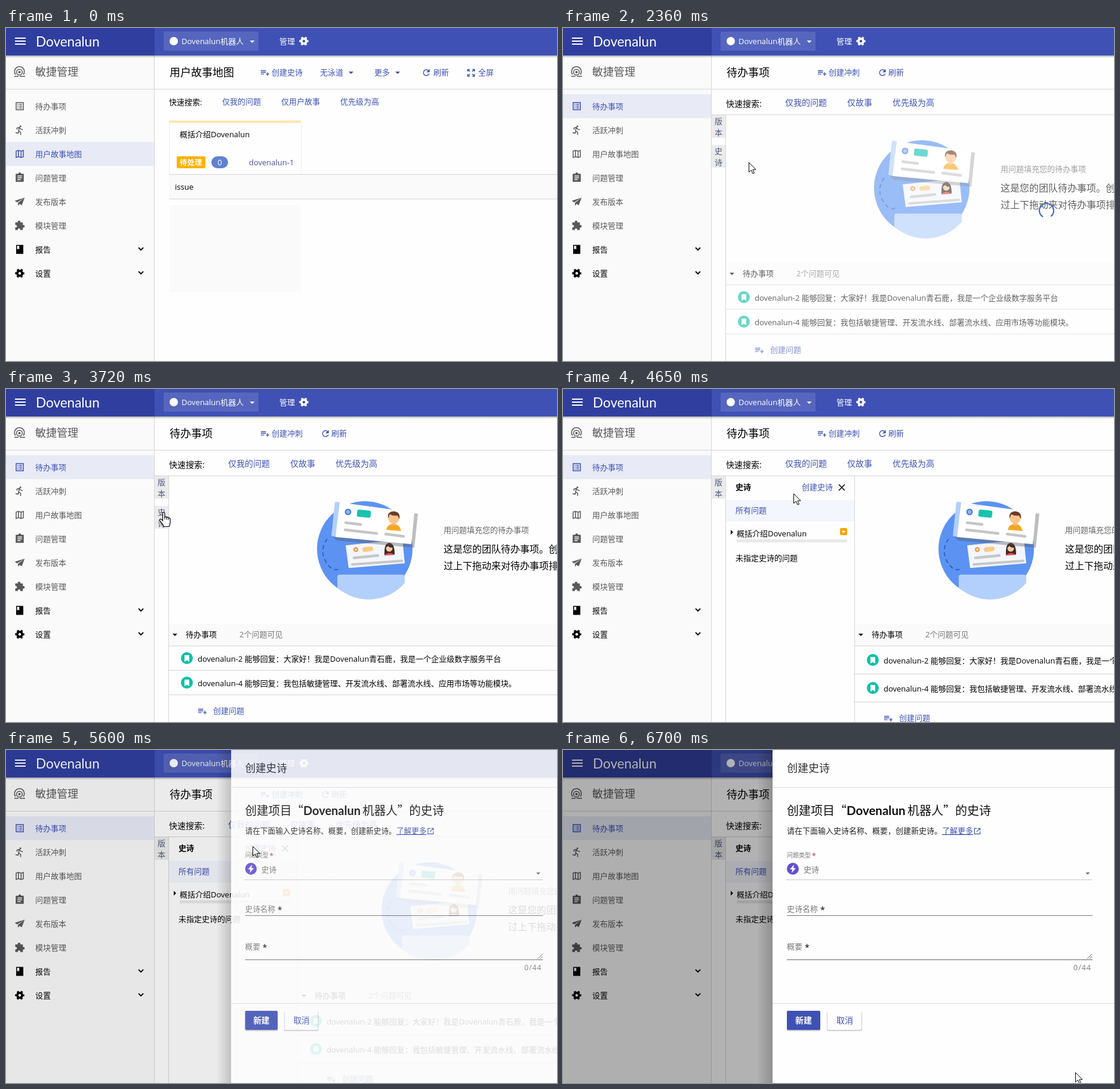
Animation of 923 by 558 pixels, one loop 6.77 s. Source, as an HTML page:

```html
<!DOCTYPE html>
<html lang="zh-CN">
<head>
<meta charset="utf-8">
<title>待办事项</title>
<style>
html, body { margin: 0; width: 100%; height: 100%; overflow: hidden; background: #fefefe; }
svg { display: block; width: 923px; height: 558px; }
text { font: 13px "Open Sans", "Noto Sans CJK SC", "Noto Sans CJK", sans-serif; }
text.cjk { font-family: "Noto Sans CJK SC", "Noto Sans CJK", sans-serif; }
text.brand { font-family: Lato, sans-serif; }
text.bold { font-weight: 700; }
</style>
</head>
<body>
<svg id="stage" viewBox="0 0 923 558" xmlns="http://www.w3.org/2000/svg"></svg>
<script>
const LOOP = 6770, BLUE = '#3f51b5', GREY = '#595959', LINE = '#d5d5d5';
const NAME = 'Dovenalun', KEY = 'dovenalun';

// Markup helpers
const text = (x, y, s, fill = '#000', size = 13, more = '') =>
  `<text x="${x}" y="${y}" fill="${fill}" style="font-size:${size}px" ${more}>${s}</text>`;
const rect = (x, y, w, h, fill, more = '') =>
  `<rect x="${x}" y="${y}" width="${w}" height="${h}" fill="${fill}" ${more}/>`;
const dot = (x, y, r, fill, more = '') => `<circle cx="${x}" cy="${y}" r="${r}" fill="${fill}" ${more}/>`;
const path = (d, fill, more = '') => `<path d="${d}" fill="${fill}" ${more}/>`;
const stroke = (d, color, width = 1, more = '') =>
  path(d, 'none', `stroke="${color}" stroke-width="${width}" ${more}`);
const hline = (x, y, color = LINE) => rect(x, y, 923 - x, 1, color);
const group = (id, body, more = '') => `<g id="${id}" ${more}>${body}</g>`;
const caret = (x, y, color, r = 4) => path(`M${x - r} ${y - r / 2}h${2 * r}l${-r} ${r}z`, color);
const bold = 'class="bold"';
const fade = (id, x2, y2, from, to) =>
  `<linearGradient id="${id}" x2="${x2}" y2="${y2}"><stop stop-opacity="${from}"/><stop offset="1" stop-opacity="${to}"/></linearGradient>`;

// Icons on a 24 unit grid
const ink = 'currentColor';
const gear = stroke('M12 6.5a5.5 5.5 0 1 1-.01 0z', ink, 5) +
  dot(12, 12, 8.8, 'none', `stroke="${ink}" stroke-width="3" stroke-dasharray="4.6 4.61" stroke-dashoffset="2.3"`);
const icons = {
  list: stroke('M4 4h16v16H4zM7 8h2m2 0h6M7 12h2m2 0h6M7 16h2m2 0h6', ink, 2),
  run: dot(13.5, 3.5, 2, ink) +
    stroke('M6 11V7.5L11 6l-1.5 8 4.5 3v6M10 14l-1.5 5-6-1.3M12 6.5c1 3 3 4.5 7 4.5', ink, 2),
  map: stroke('M4 5.5l5-1.5 6 2 5-2v14.5l-5 1.5-6-2-5 2zM9 4v14M15 6v14', ink, 2),
  task: path('M3 3h6a3 3 0 0 1 6 0h6v18H3z', ink) + stroke('M7 8h10M7 12h10M7 16h7', '#fafafa', 2),
  plane: path('M23 3L1 10l5 3.5zM23 3L8 14.5V21l3.5-4 5 3z', ink),
  puzzle: path('M2 5h17v17H2z', ink) + dot(10.5, 4, 3, ink) + dot(20, 13.5, 3, ink) +
    dot(3, 13.5, 2.7, '#fafafa') + dot(10.5, 21, 2.7, '#fafafa'),
  book: path('M4 2h16v20H4z', ink) + path('M6 4h5v8l-2.5-1.5L6 12z', '#fafafa'),
  gear,
  add: stroke('M2 7h12M2 11h12M2 15h8M18 11v8M14 15h8', ink, 2),
  refresh: stroke('M18 7.5A7 7 0 1 0 19 14', ink, 2) + path('M20 3v8h-8z', ink),
  full: stroke('M4 9V4h5M4 4l5 5M15 4h5v5M20 4l-5 5M4 15v5h5M4 20l5-5M20 15v5h-5M20 20l-5-5', ink, 2),
  open: stroke('M11 4H4v16h16v-7M14 4h6v6M20 4L10 14', ink, 2)
};
const icon = (name, x, y, size, color = ink) =>
  `<g color="${color}" transform="translate(${x - size / 2} ${y - size / 2}) scale(${size / 24})">${icons[name]}</g>`;
const action = (name, cx, x, label) => icon(name, cx, 75, 17, BLUE) + text(x, 79, label, BLUE);

const menu = [['list', '待办事项'], ['run', '活跃冲刺'], ['map', '用户故事地图'], ['task', '问题管理'],
  ['plane', '发布版本'], ['puzzle', '模块管理'], ['book', '报告'], ['gear', '设置']];

function chrome() {
  return rect(0, 46, 923, 4, 'url(#below)') + rect(0, 0, 249, 46, '#303f9f') + rect(249, 0, 674, 46, BLUE) +
    stroke('M15 17h18M15 22h18M15 27h18', '#fff', 2) +
    text(50, 31, NAME, '#fff', 22.5, 'class="brand"') +
    rect(264, 6, 159, 32, '#fff', 'fill-opacity=".12" rx="2"') + dot(281, 22, 7, '#fff') +
    text(294, 27, NAME + '机器人', '#fff') + caret(412.5, 23, '#fff') +
    text(458, 27, '管理', '#fff') + icon('gear', 499, 22, 18, '#fff');
}

function sidebar() {
  const rows = menu.map(([name, label], i) => {
    const y = 131 + 40 * i;
    const arrow = i > 5 ? stroke(`M222 ${y - 3}l4 4 4-4`, '#000', 1.8) : '';
    return rect(0, y - 20, 248, 40, 'none', `id="bg${i}"`) +
      group('row' + i, icon(name, 23, y, 18) + text(49, y + 5, label, ink) + arrow);
  }).join('');
  return rect(0, 46, 248, 512, '#fafafa') + rows + rect(248, 46, 1, 512, LINE) +
    stroke('M16 78a8.2 8.2 0 1 1 13 0M14 81h7m2 0h9', GREY, 1.6) +
    dot(22.5, 74, 4.8, 'none', `stroke="${GREY}" stroke-width="1.5"`) + dot(22.5, 74, 2, GREY) +
    text(49, 80, '敏捷管理', GREY, 18) + hline(0, 102);
}

function storyMap() {
  return text(274, 81, '用户故事地图', '#000', 18) + action('add', 434, 445, '创建史诗') +
    text(526, 79, '无泳道', BLUE) + caret(578, 75, BLUE) + text(617, 79, '更多', BLUE) + caret(656, 75, BLUE) +
    action('refresh', 704, 716, '刷新') + action('full', 779, 791, '全屏') +
    text(273, 129, '快速搜索:') + text(362, 128, '仅我的问题', BLUE) +
    text(461, 128, '仅用户故事', BLUE) + text(560, 128, '优先级为高', BLUE) +
    rect(273, 156, 222, 90, '#ededed', 'rx="2"') + rect(274, 155, 220, 90, '#fefefe') +
    rect(274, 155, 220, 4, '#ffe5b0') + text(291, 183, '概括介绍' + NAME) +
    rect(286, 215, 48, 20, '#ffb100', 'rx="2"') + text(291, 230, '待处理', '#fff', 12.5, bold) +
    rect(344, 215, 28, 20, '#6082cf', 'rx="10"') + text(358, 230, '0', '#fff', 13, 'text-anchor="middle"') +
    text(407, 230, KEY + '-1', '#4a4f9c') +
    rect(273, 245, 650, 42, '#fafafa') + hline(273, 245) + hline(273, 286) +
    text(283, 271, 'issue') + rect(274, 297, 220, 145, '#fafafa');
}

function illustration() {
  const bar = (d, w = 4.5) => stroke(d, '#c6c6c6', w, 'stroke-linecap="round"');
  return dot(601, 268, 80, '#5c93f3') +
    path('M555 335V315q0-4 4-4h105q4 0 4 4v10A80 80 0 0 1 555 333z', '#b3cffb') +
    stroke('M538 251Q525 270 535 288T557 302', '#2d5eb8', 1.8, 'stroke-dasharray="7 5"') +
    path('M569 262L664 252 668 292 574 300z', '#f3f6fd') +
    dot(586, 269, 3, 'none', 'stroke="#f39a4a" stroke-width="2.5"') +
    stroke('M601 269l10-1', '#fdcb80', 8, 'stroke-linecap="round"') +
    bar('M583 283l40-4') + bar('M580 294l83-6', 4) +
    path('M634 278q-1-20 8-20t9 19z', '#3a2b2b') + path('M633 279q9-8 18-1z', '#e5484d') +
    dot(642, 267, 5.5, '#fac79a') + path('M636 266q1-7 7-6 5 1 5 6-6 0-8-3z', '#3a2b2b') +
    path('M683 208l7 1-6 57-130-12-6-6z', '#555', 'opacity=".38"') +
    path('M551 189l9 1-7 58-8-2z', '#b3cffb') + path('M559 190L684 207 679 260 552 248z', '#fff') +
    dot(573, 206, 5.5, '#4c84ea') + dot(573, 206, 2, 'none', 'stroke="#fff"') +
    rect(588, 203, 23, 12, '#16c3b0', 'rx="3" transform="rotate(6 600 209)"') +
    bar('M569 224l25 3') + bar('M568 236l53 6') + bar('M636 243l30 4') +
    path('M637 236q2-10 12-10t13 12z', '#f6a821') + rect(646, 222, 6, 7, '#f0b27c') +
    dot(649.5, 217, 9, '#fac38b') + path('M640 217q-2-12 10-12 11 1 9 13l-3-6q-8 1-13-2z', '#6b3d2a');
}

function issue(i, s) {
  return group('issue' + i, dot(303, 0, 10, '#10bfa9') +
    path('M299-5h8V6l-4-2.5-4 2.5z', '#fff') + text(321, 5.5, s) + hline(273, 20));
}

function backlog() {
  return text(274, 81, '待办事项', '#000', 18) + action('add', 434, 445, '创建冲刺') +
    action('refresh', 535, 545, '刷新') + text(273, 132, '快速搜索:', '#000', 14) +
    text(372, 130, '仅我的问题', BLUE, 14) + text(476, 130, '仅故事', BLUE, 14) +
    text(552, 130, '优先级为高', BLUE, 14) + hline(249, 145) +
    rect(249, 146, 23, 38, '#ebebeb') + text(254, 161, '版', '#4d5a7c') + text(254, 180, '本', '#4d5a7c') +
    group('epicTab', rect(249, 196, 23, 38, '#ebebeb') + text(254, 211, '史', '#4d5a7c') + text(254, 230, '诗', '#4d5a7c')) +
    rect(272, 146, 1, 412, LINE) +
    group('data',
      group('intro', illustration() + text(733, 241, '用问题填充您的待办事项', '#666') +
        text(733, 274, '这是您的团队待办事项。创建', '#000', 16) +
        text(733, 302, '过上下拖动来对待办事项排序', '#000', 16)) +
      group('issues', rect(273, 393, 650, 37, '#fafafa') + hline(273, 430) + caret(283, 412, '#000') +
        text(301, 416, '待办事项') + text(391, 416, '2个问题可见', '#777') +
        issue(0, `${KEY}-2 能够回复：大家好！我是${NAME}青石鹿，我是一个企业级数字服务平台`) +
        issue(1, `${KEY}-4 能够回复：我包括敏捷管理、开发流水线、部署流水线、应用市场等功能模块。`) +
        group('newIssue', icon('add', 329, 1, 17, BLUE) + text(347, 5, '创建问题', BLUE)))) +
    group('spinner', stroke('M-6 10.4A12 12 0 1 1 7 9.7', '#3f70c4', 2.2)) +
    group('epics', rect(273, 146, 215, 412, '#fefefe') + rect(488, 146, 1, 412, LINE) +
      text(289, 169, '史诗', '#000', 13, bold) + text(400, 169, '创建史诗', BLUE) +
      stroke('M462 160l10 10m0-10l-10 10', '#000', 1.5) +
      rect(273, 186, 215, 36, '#f4f6fe') + text(289, 208, '所有问题', BLUE) +
      path('M281 236l4 4-4 4z', '#000') + text(291, 247, '概括介绍' + NAME) +
      rect(464, 233, 12, 12, '#f7a40b', 'rx="2"') + caret(470, 239.5, '#fff', 3.5) +
      rect(291, 252, 185, 5, '#e8e8e8') + text(289, 288, '未指定史诗的问题'));
}

function dialog() {
  const field = (y, label, starX) => text(375, y, label, '#777') + text(starX, y + 2, '*', '#000', 14);
  return group('mask', rect(0, 0, 923, 558, '#000')) + group('dialog',
    rect(325, 0, 26, 558, 'url(#beside)') +
    rect(351, 0, 1021, 558, '#fefefe') + text(375, 37, '创建史诗', '#333', 18) + rect(351, 62, 1021, 1, '#ddd') +
    text(375, 109, '创建项目“', '#111', 20, 'class="cjk"') + text(475, 109, NAME, '#111', 20.5, 'class="brand bold"') +
    text(577, 109, '机器人”的史诗', '#111', 20, 'class="cjk"') +
    text(375, 140, '请在下面输入史诗名称、概要，创建新史诗。', '#222') +
    text(635, 140, '了解更多', BLUE, 13, 'text-decoration="underline"') + icon('open', 694, 136, 14, BLUE) +
    text(375, 180, '问题类型', '#777', 10) + text(417, 182, '*', '#d0302f', 12) +
    dot(385, 199, 10, '#6150d0') + path('M387 192l-7 8h4l-1 6 7-8h-4z', '#fff') +
    text(403, 205, '史诗', '#777') + caret(879, 207, '#666', 3.5) +
    stroke('M375 217.5H887', '#777', 1, 'stroke-dasharray="1 1.5"') +
    field(271, '史诗名称', 431) + rect(375, 277, 512, 1, '#777') +
    field(334, '概要', 405) + rect(375, 351, 512, 1, '#666') + stroke('M878 350l8-8m-4 8l4-4', '#666', 1) +
    text(855, 369, '0/44', '#777', 12.5, 'letter-spacing="1"') + rect(351, 424, 1021, 1, '#ddd') +
    rect(375, 438, 56, 33, '#000', 'opacity=".2" rx="2"') + rect(375, 437, 56, 32, BLUE, 'rx="2"') +
    text(389, 458, '新建', '#fff', 14, bold) +
    rect(442, 438, 59, 33, '#000', 'opacity=".18" rx="2"') + rect(443, 437, 57, 32, '#fefefe', 'rx="2"') +
    text(458, 458, '取消', BLUE, 14));
}

const pointers = group('cursor',
  group('arrow', path('M0 0V16L4 12.5 6.5 18.5 9 17.5 6.5 11.7H11.5Z', '#fff', 'stroke="#000"')) +
  group('hand', path('M-2 2Q-2 0-.3 0 1.4 0 1.4 2V8Q3.5 6.8 4.6 8.6 6.5 7.6 7.6 9.4 10.6 8.8 10.6 12V17' +
    'Q10.6 20 8.5 24H-.5Q-1 21-5.5 16-8 12.5-6.5 11.5-4.5 11-2 14Z', '#fff', 'stroke="#000" stroke-width="1.2"') +
    stroke('M1.4 8v4M4.6 8.6v4M7.6 9.4v4', '#000')));

const stage = document.getElementById('stage');
stage.innerHTML = `<defs>${fade('below', 0, 1, 0.3, 0)}${fade('beside', 1, 0, 0, 0.2)}</defs>` +
  rect(0, 0, 923, 558, '#fefefe') + group('story', storyMap()) + group('backlog', backlog()) +
  sidebar() + chrome() + dialog() + pointers;

const el = id => document.getElementById(id);
const show = (id, on) => el(id).setAttribute('display', on ? 'inline' : 'none');
const move = (id, x, y, more = '') => el(id).setAttribute('transform', `translate(${x} ${y}) ${more}`);
const clamp = v => Math.max(0, Math.min(1, v));

// The screen refreshes in bursts: [first, last, count]
const bursts = [[220, 840, 9], [920, 1310, 6], [1460, 1460, 1], [1610, 2240, 9], [2360, 3030, 10], [3110, 3270, 3],
  [3440, 3570, 3], [3720, 3720, 1], [3970, 3970, 1], [4120, 4120, 1], [4270, 4920, 9], [4970, 5150, 3],
  [5510, 6170, 9], [6210, 6700, 7]];
function lastRefresh(t) {
  const burst = bursts.filter(b => b[0] <= t).pop();
  if (!burst) return 0;
  const [first, last, count] = burst;
  if (t >= last) return last;
  const gap = (last - first) / (count - 1);
  return first + Math.floor((t - first) / gap + 1e-6) * gap;
}

// Pointer route: [time, x, y]
const route = [[220, 670, 525], [840, 147, 157], [1310, 92, 130], [1640, 92, 130], [2240, 309, 222], [2360, 311, 225],
  [3030, 305, 215], [3270, 263, 205], [3720, 264, 206], [3970, 262, 211], [4120, 262, 211], [4270, 268, 219],
  [4595, 386, 175], [4920, 413, 167], [5150, 413, 161], [6100, 413, 161], [6210, 485, 205], [6700, 858, 540]];
function pointerAt(t) {
  const i = route.findIndex(p => p[0] > t);
  if (i < 0) return route[route.length - 1].slice(1);
  if (i === 0) return route[0].slice(1);
  const [t0, x0, y0] = route[i - 1], [t1, x1, y1] = route[i];
  const k = (t - t0) / (t1 - t0);
  return [x0 + (x1 - x0) * k, y0 + (y1 - y0) * k];
}

function render(time) {
  const t = lastRefresh(time);
  const onBacklog = t >= 1610, epicsOpen = t >= 3970, dialogOpen = t >= 5510;
  const [x, y] = pointerAt(t);
  const inside = (x0, y0, x1, y1) => x >= x0 && x < x1 && y >= y0 && y < y1;

  const selected = onBacklog ? 0 : 2;
  const hovered = t >= 220 && inside(0, 111, 248, 431) ? Math.floor((y - 111) / 40) : -1;
  menu.forEach((item, i) => {
    el('bg' + i).setAttribute('fill', i === selected ? '#e8eaf6' : i === hovered ? '#eee' : 'none');
    el('row' + i).setAttribute('color', i === selected || i === hovered ? BLUE : i > 5 ? '#000' : GREY);
  });

  show('story', !onBacklog);
  show('backlog', onBacklog);
  show('epicTab', !epicsOpen);
  show('epics', epicsOpen);
  show('data', t >= 1990);
  const loaded = clamp((t - 2400) / 400);
  el('data').setAttribute('opacity', 0.62 + 0.38 * loaded);
  el('data').style.filter = loaded < 1 ? 'blur(.4px)' : 'none';
  // The list gives up the panel's width; the centred intro moves by half of it
  const panelWidth = epicsOpen ? 216 : 0;
  move('intro', panelWidth / 2, 0);
  move('issues', panelWidth, 0);
  const rowHeight = epicsOpen ? 47 : 41;
  for (const i of [0, 1]) {
    move('issue' + i, 0, 430 + rowHeight * (i + 0.5) + 0.5);
    el('issue' + i).querySelector('rect').setAttribute('y', rowHeight / 2 - 0.5);
  }
  move('newIssue', 0, 457 + 2 * rowHeight);
  show('spinner', t >= 1690 && t < 2500);
  move('spinner', 810, 306, `rotate(${(t - 2360) * 0.36})`);

  show('mask', dialogOpen);
  show('dialog', dialogOpen);
  const u = clamp((t - 5472) / 300), p = 1 - (1 - u) ** 4, sx = 0.8 + 0.2 * p;
  el('mask').setAttribute('opacity', 0.3 * u ** 1.5);
  el('dialog').setAttribute('opacity', p);
  move('dialog', 1372 * (1 - sx), 0, `scale(${sx} 1)`);

  const overTab = onBacklog && !epicsOpen && inside(249, 196, 272, 234);
  const overCreate = epicsOpen && !dialogOpen && inside(400, 156, 453, 176);
  const link = hovered >= 0 || overTab || overCreate;
  show('cursor', t >= 220);
  show('hand', link);
  show('arrow', !link);
  move('cursor', Math.round(x) + 0.5, Math.round(y) + 0.5);
}

const start = performance.now();
function tick() {
  render((performance.now() - start) % LOOP);
  requestAnimationFrame(tick);
}
tick();
</script>
</body>
</html>
```
